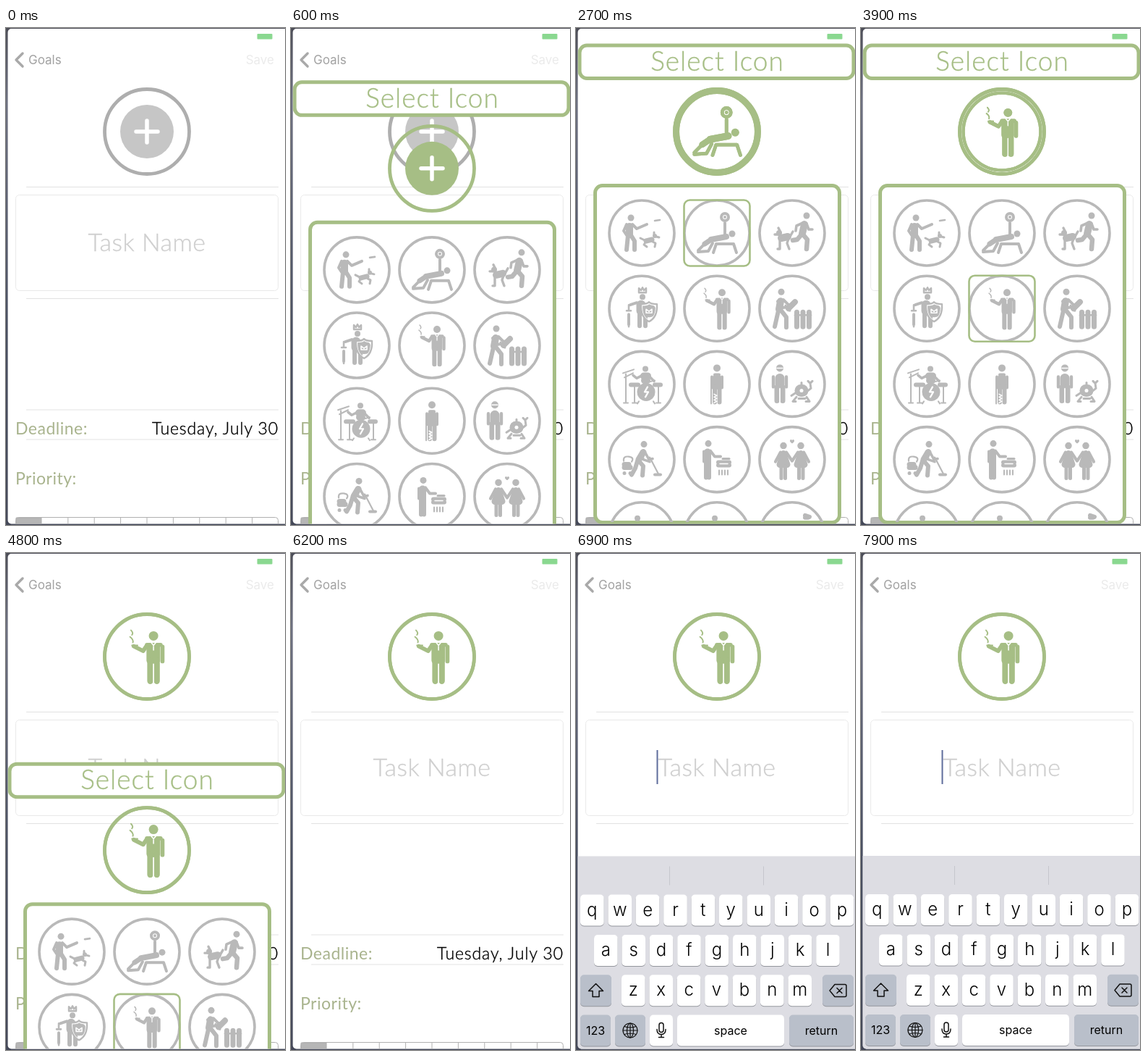
These frames come from a looping animation (386 px wide and 686 px high, 8000 ms). An HTML page:

```html
<!DOCTYPE html>
<html lang="en">
<head>
<meta charset="utf-8">
<title>Icon picker</title>
<style>
  html, body { margin: 0; width: 100%; height: 100%; overflow: hidden; background: #4a4f5e; }
  svg { display: block; }
  text { font-family: Lato, "Open Sans", sans-serif; }
  .ui, .ui text { font-family: Inter, Roboto, sans-serif; }
  .line { fill: none; stroke-linecap: round; stroke-linejoin: round; }
  .light { font-weight: 300; stroke: currentColor; stroke-width: .4; fill: currentColor; }
</style>
</head>
<body>
<svg width="386" height="686" viewBox="0 0 386 686">
  <defs id="defs">
    <clipPath id="screen"><rect x="2.5" y="1" width="390" height="683.5" rx="5"/></clipPath>
    <clipPath id="inner"><rect x="26" y="218" width="339" height="464" rx="9"/></clipPath>
    <linearGradient id="edge" x2="0" y2="1">
      <stop stop-color="#4c4d57"/><stop offset=".15" stop-color="#6d7080"/>
      <stop offset=".6" stop-color="#484e60"/><stop offset="1" stop-color="#444858"/>
    </linearGradient>
  </defs>
  <rect width="386" height="686" fill="url(#edge)"/>
  <g clip-path="url(#screen)">
    <rect width="400" height="690" fill="#fff"/>
    <rect x="347.5" y="8" width="21" height="7.5" rx="1" fill="#8ad890"/>
    <g class="ui" font-size="17">
      <path class="line" d="M23 35l-9 9 9 9" stroke="#a9a9a9" stroke-width="3.4"/>
      <text x="31" y="50" fill="#a2a2a2">Goals</text>
      <text x="371" y="50" fill="#ebebeb" text-anchor="end">Save</text>
    </g>
    <path d="M28 219.5H377M28 373.5H377M28 527H377M28 568H377" stroke="#e2e2e2"/>
    <rect x="13.5" y="230.5" width="363" height="132" rx="5" fill="none" stroke="#e9e9e9"/>
    <text class="light" x="195" y="307.5" font-size="34" letter-spacing=".5" text-anchor="middle" color="#cfcfcf">Task Name</text>
    <rect id="caret" x="111.5" y="272" width="2" height="47" fill="#5e6d9c"/>
    <g font-size="23" letter-spacing=".5">
      <text x="13" y="560.5" fill="#a9b48e">Deadline:</text>
      <text class="light" x="377" y="560.5" letter-spacing=".9" text-anchor="end" color="#000">Tuesday, July 30</text>
      <text x="13" y="629.5" fill="#a9b48e">Priority:</text>
    </g>
    <g id="segments" fill="none" stroke="#b0b0b0"><rect x="13.5" y="675.5" width="363" height="30" rx="4"/></g>
    <g class="badge"></g>

    <g id="panel">
      <g fill="#fff" stroke="#a6be85" stroke-width="5">
        <rect x="5" y="24" width="379" height="45.5" rx="10"/>
        <rect x="26.5" y="217.5" width="338" height="465" rx="10"/>
      </g>
      <text class="light" x="195.5" y="59" font-size="37" letter-spacing="1" text-anchor="middle" color="#a6be85" stroke-width=".8">Select Icon</text>
      <g clip-path="url(#inner)">
        <g id="grid" color="#b9b9b9"></g>
        <rect id="pick" x="149.5" width="91" height="91" rx="8" fill="none" stroke="#a6be85" stroke-width="2.6"/>
      </g>
      <g class="badge"></g>
    </g>

    <g id="keys" class="ui" text-anchor="middle">
      <rect y="418" width="400" height="290" fill="#dddde3"/>
      <path d="M129.5 432v26M259.5 432v26" stroke="#c5c6cd"/>
    </g>
  </g>
</svg>
<script>
const $ = s => document.querySelector(s);
const add = (el, markup) => el.insertAdjacentHTML('beforeend', markup);
const GREEN = '#a6be85', GRAY = '#aeaeae';

// Each icon is a list of strokes [width, path, white?]; zero-length strokes are dots.
const icons = [
  [[9, 'M-15-21h0'], [10, 'M-17-9V2'], [4, 'M-21-12l-4 9 4 6M-13-12l6 6 14-6'], [6, 'M-19 3l-2 20M-15 3l5 8 0 12'],
   [2.6, 'M18-17l7-1'], [7, 'M6 11l8-2'], [6, 'M18 4h0'], [3, 'M20 5l4 1M17-1v4M5 13l-2 3 4 3M15 12l4 2-1 5M4 10l-6-3']],
  [[4, 'M16-22a5 5 0 1 0-10 0a5 5 0 1 0 10 0'], [4, 'M11-22h0M11-14V3'], [9, 'M21 1h0'], [8, 'M13 5L-8 9'],
   [7, 'M-8 9l-9 6'], [4, 'M-17 15l-9 9M-26 26l14-1 6-11M-5 27l4-12h24l4 12']],
  [[9, 'M20-24h0'], [10, 'M17-12L14 1'], [3.6, 'M15-14l-9 4-1 7M20-13l3 8 5 0'], [6.5, 'M15 2l6 7-1 13M13 2L7 9l-6 1'],
   [10, 'M-15 7l9-2'], [8, 'M-18 0h0'], [3.4, 'M-24 2l4 0M-19-7l3 6M-17 9l0 13M-5 8l-2 6 3 8M-3 5l4-7M-20 22h3']],
  [[2.5, 'M-4-22v-6l3 3 2-4 2 4 3-3v6z'], [8, 'M1-16h0'], [13, 'M-1-5V3'], [6, 'M-3 4v20M5 4v20'], [4, 'M-7-8l-9 3M-18 8V22'],
   [2.6, 'M-18-5v8M-18 22v3M-21 3h6'], [18, 'M9 3h2'], [2.4, 'M0-5q10 0 10-3q2 3 10 3q1 17-10 22q-11-5-10-22', 1],
   [2.4, 'M-1-6q9 0 11-3q2 3 11 3q1 18-11 24q-12-6-11-24'], [1.6, 'M6 6v-5l4 3 4-3v5z', 1]],
  [[10, 'M7-22h0'], [9, 'M4-10V4M9.500-10V4'], [4.4, 'M0-12.500H14.500M16.500-10.500V5M0-12l-4 6-10-5'], [6.400, 'M3.500 4v22M10.500 4v22'],
   [1.5, 'M-17-28q3 3 1 5M-18-21q4 3 3 6M-16-12h6'], [1.2, 'M4.500-15l2.500 3 2.500-3M7-11v4M7 8v20', 1]],
  [[9, 'M-15-23h0'], [10, 'M-16-10l-2 11'], [4, 'M-12-12l7 7 6-1M-20-10l5 9 8-1'], [8, 'M-5 0L4-9'], [3, 'M-9-4l6 7'],
   [6, 'M-19 3l-5 22M-15 3l7 9 0 14'], [7, 'M6.500 5v20M15 5v20M23.500 5v20'], [2.5, 'M4 9h22']],
  [[8, 'M5-21h0'], [10, 'M3-11h5M4-5h3'], [3.6, 'M1-12l-8 4-5-4M10-11l7 7'], [2, 'M-26-15l15-5M-24-9l12-6M18-5l-7 2'],
   [25, 'M6 11h0'], [6, 'M-15 1h10M18 1h8'], [2, 'M-22-14v40M-25 26h6M-10 4v22M-13 26h6M23 4v22M20 26h6M-4 24l-2 3M16 24l2 3'],
   [2.2, 'M8 4l-4 7h5l-4 7', 1]],
  [[10, 'M0-22h0'], [11, 'M0-9V2'], [4, 'M-3-13H3M-7-10V5M7-10V5'], [6, 'M-3 3v22M3.500 3v22'], [2, 'M-8 4v23'],
   [1.5, 'M-4 14l4 2-4 2 4 2-4 2 4 2-4 2', 1]],
  [[10, 'M-17-22h0'], [13, 'M-17-8V0'], [4.4, 'M-26-10V4M-8-10V4'], [7, 'M-21 4v19M-13 4v19'], [1.5, 'M-21-22h8M-17 6v18', 1],
   [17, 'M12 9h2'], [5, 'M13 9h0', 1], [3, 'M13 2v-4M6 18l-5 6h4M20 18l4 6h-5M21 10l5-4-1-7M22-4l3 3 3-3M5 12l-6 4M9 20h9']],
  [[9, 'M3-21h0'], [9, 'M2-10L-4 0'], [3.6, 'M5-9l5 9 5-1M0-9l2 9 9 3'], [6, 'M-4 2l6 7-1 13M-6 2l-3 10-5 9'],
   [2.2, 'M11-3L23 20M-14 3q4-6-4-7q-8-1-7 6'], [4, 'M18 21h8'], [7, 'M-24 7h6M-24 11h8'], [5, 'M-24 19h0M-16 19h0']],
  [[9, 'M-12-22h0'], [10, 'M-13-10V1'], [4, 'M-9-12l6 8 8 0M-18-11V3'], [6, 'M-15 3v22M-11 3v22'], [6, 'M2 4h15M2 8h15'],
   [1.5, 'M4 6h11', 1], [2, 'M3 15v6M7 15v6M11 15v6M15 15v6'], [3, 'M8-1h9']],
  [[9.5, 'M-12-19h0M12-19h0'], [3, 'M-1.500-26h0M1.500-26h0M-1.500-25.500L0-24l1.500-1.500'],
   [9, 'M-12-8l-5 15h10zM12-8l5 15h-10z'], [4.2, 'M-16-10l-7 13M16-10l7 13M-8-10l8 12 8-12'], [5, 'M-15 9v17M-9.500 9v17M15 9v17M9.500 9v17']],
  [[8, 'M-6-23h0'], [9, 'M-7-10V4']],
  [[8, 'M-3-23h0'], [9, 'M-3-10V4']],
  [[6, 'M18-27l6 2M18-24h4'], [9, 'M16-10V4']]
];

icons.forEach((parts, i) => {
  const lines = parts.map(([w, d, white]) =>
    `<path d="${d}" stroke-width="${w}" stroke="${white ? '#fff' : 'currentColor'}"/>`).join('');
  add($('#defs'), `<g id="i${i}" class="line"><circle r="45" stroke="currentColor" stroke-width="3.6"/>${lines}</g>`);
  add($('#grid'), `<use href="#i${i}" x="${91 + i % 3 * 104}" y="${283 + Math.floor(i / 3) * 104.2}"/>`);
});

const badges = [...document.querySelectorAll('.badge')];
for (const b of badges) {
  b.setAttribute('transform', 'translate(195 143)');
  add(b, `<circle class="ring" r="58.5" fill="none" stroke-width="4.8"/>
    <g class="plus"><circle r="37"/><path class="line" d="M-15 0h30M0-15v30" stroke="#fff" stroke-width="5.5"/></g>
    <use class="icon" color="${GREEN}"/>`);
}

for (let i = 0; i < 9; i++)
  add($('#segments'), i ? `<path d="M${13 + (i + 1) * 36.4} 676v20"/>` : '<path d="M14 676h35v20h-35z" fill="#b6b6b6"/>');

function key(x, y, w, label, size = 24, fill = '#fff') {
  add($('#keys'), `<rect x="${x}" y="${y + 1}" width="${w}" height="43" rx="5" fill="#94969d"/>
    <rect x="${x}" y="${y}" width="${w}" height="43" rx="5" fill="${fill}"/>
    <text x="${x + w / 2}" y="${y + (size > 20 ? 29 : 27)}" font-size="${size}" font-weight="${size > 20 ? 300 : 400}">${label}</text>`);
}
[['qwertyuiop', 6], ['asdfghjkl', 25], ['zxcvbnm', 63]].forEach(([row, x], r) =>
  [...row].forEach((c, i) => key(x + i * 38.4, 471 + r * 55.4, 32.6, c)));
const DIM = '#b9bfca';
key(6, 581.8, 43, '', 16, DIM);
key(341, 581.8, 43, '', 16, DIM);
key(6, 637, 42, '123', 16, DIM);
key(54, 637, 42, '', 16, DIM);
key(102, 637, 32, '');
key(140, 637, 148, 'space', 16);
key(295, 637, 89, 'return', 16, DIM);
add($('#keys'), `<g class="line" stroke="#111" stroke-width="1.5">
  <path d="M27.5 594l-10 10h5.5v8h9v-8h5.5z"/>
  <path d="M358 595h14q2 0 2 2v13q0 2-2 2h-14l-7-8.5zM361 600l7 7M368 600l-7 7"/>
  <g stroke-width="1.2"><circle cx="75" cy="658.5" r="10"/><ellipse cx="75" cy="658.5" rx="4.5" ry="10"/>
  <path d="M65 658.5h20M75 648.5v20M67 653q8 3 16 0M67 664q8-3 16 0"/></g>
  <rect x="115" y="648" width="6" height="13" rx="3"/><path d="M112 657q0 7 6 7t6-7M118 664v4M114.5 668h7"/></g>`);

// Share of a decelerating move still to go.
const rest = (t, start, time, power) => Math.min(1, Math.max(0, 1 - (t - start) / time)) ** power;

function draw(t) {
  const slide = t < 2500 ? rest(t, 300, 700, 4.65) : 1 - rest(t, 4700, 400, 1.715);
  $('#panel').setAttribute('transform', `translate(0 ${686 * slide})`);
  $('#keys').setAttribute('transform', `translate(0 ${268 * rest(t, 6300, 900, 5.7)})`);

  const chosen = t < 2500 ? -1 : t < 3800 ? 1 : 4;
  const grow = 1 - .4 * (chosen == 1 ? rest(t, 2400, 700, 3) : rest(t, 3700, 500, 3));
  badges.forEach((b, front) => {
    const color = front || chosen > 0 ? GREEN : GRAY;
    b.querySelector('.ring').setAttribute('stroke', color);
    const plus = b.querySelector('.plus'), icon = b.querySelector('.icon');
    plus.setAttribute('fill', front ? GREEN : '#c6c6c6');
    plus.style.display = chosen < 0 ? '' : 'none';
    icon.style.display = chosen < 0 ? 'none' : '';
    icon.setAttribute('href', '#i' + Math.max(chosen, 0));
    icon.setAttribute('transform', `scale(${1.3 * grow})`);
  });
  $('#pick').style.display = chosen < 0 ? 'none' : '';
  $('#pick').setAttribute('y', chosen == 1 ? 237.5 : 341.7);

  const blink = (Math.abs(t - 7620) - 40) / 240;
  $('#caret').style.opacity = t < 6400 ? 0 : Math.min(1, Math.max(0, blink));
}

// The picture advances ten times a second.
function tick() {
  draw(Math.floor(performance.now() % 8000 / 100) * 100);
  requestAnimationFrame(tick);
}
tick();
</script>
</body>
</html>
```
